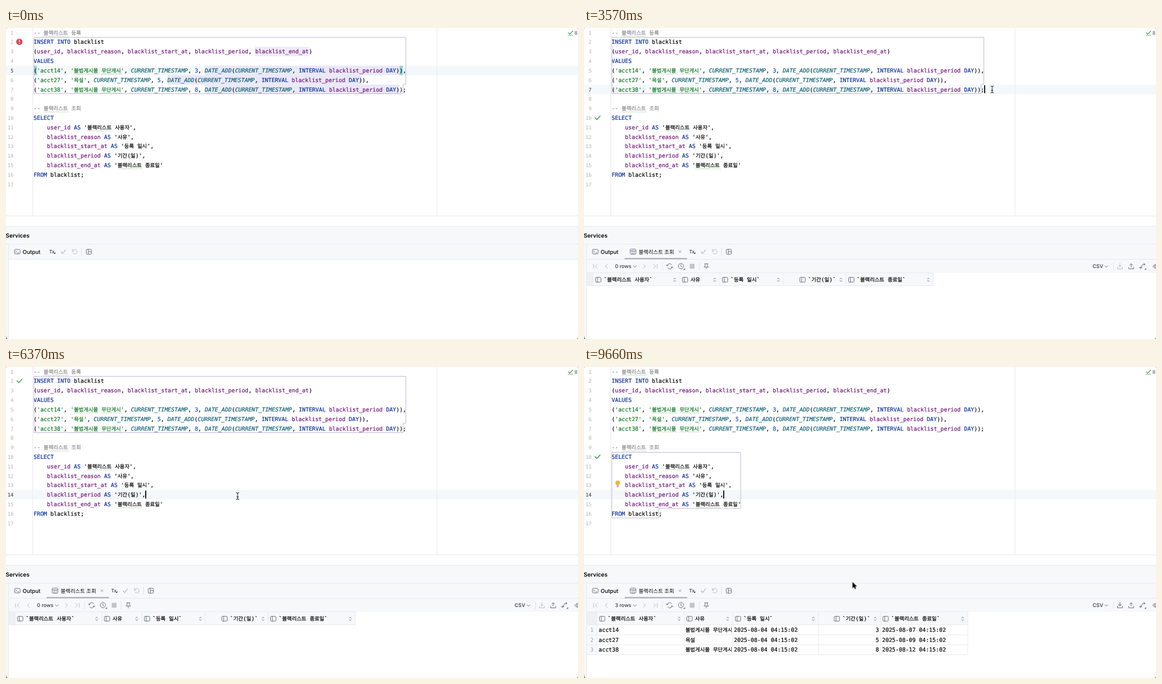
Animation of 1015x552 px, one loop 9730 ms. Source, as an HTML page:

```html
<!DOCTYPE html>
<html lang="ko">
<head>
<meta charset="utf-8">
<title>Blacklist query</title>
<style>
html, body { margin: 0; width: 100%; height: 100%; overflow: hidden; background: #fff; }
svg { display: block; width: 1015px; height: 552px; }
text { text-rendering: geometricPrecision; }
.mono { font: 9.89px "DejaVu Sans Mono", "Noto Sans Mono", monospace; }
.ko { font: 9.35px "Noto Sans CJK KR", "Noto Sans CJK JP", "Noto Sans CJK", sans-serif; }
.ui { font: 500 9.7px Inter, "Noto Sans CJK KR", sans-serif; }
.code { stroke-width: .22px; }
</style>
</head>
<body>
<svg id="stage" viewBox="0 0 1015 552"></svg>
<script>
const T = 9730, PITCH = 5.957, KO_PITCH = 8.6, ROW = 16.82;
const stage = document.getElementById('stage');
const INK = '#080808', ICON = '#6c707e', DIM = '#b8bac3', LINE = '#e8e9ee', PANEL = '#f7f8fa';
const GREEN = '#4fa35c', CALL = '#0f5f73';

function make(tag, attrs = {}, parent = stage) {
  const el = document.createElementNS('http://www.w3.org/2000/svg', tag);
  for (const key in attrs) el.setAttribute(key, attrs[key]);
  parent.appendChild(el);
  return el;
}
const group = (parent = stage) => make('g', {}, parent);
const rect = (p, x, y, width, height, fill, rx = 0) => make('rect', { x, y, width, height, fill, rx }, p);
const stroke = (p, d, color = ICON, w = 1) => make('path', {
  d, fill: 'none', stroke: color, 'stroke-width': w, 'stroke-linecap': 'round', 'stroke-linejoin': 'round'
}, p);
const fill = (p, d, color) => make('path', { d, fill: color }, p);
function label(p, str, x, y, cls, color, attrs = {}) {
  const el = make('text', { x, y, class: cls, fill: color, ...attrs }, p);
  el.textContent = str;
  return el;
}

// Timeline helpers: every track lasts one loop.
function run(el, frames) {
  el.animate(frames, { duration: T, iterations: Infinity });
}
function show(el, ...spans) {
  const frames = [];
  const add = (t, opacity) => frames.push({ offset: t / T, opacity, easing: 'step-end' });
  if (spans[0][0] > 0) add(0, 0);
  for (const [from, to] of spans) {
    add(from, 1);
    add(to, to < T ? 0 : 1);
  }
  if (frames[frames.length - 1].offset < 1) add(T, 0);
  run(el, frames);
}

// Code text on a fixed pitch; Hangul has its own size and pitch.
const isKo = s => /[가-힣]/.test(s);
const TYPO = /^(블랙리스트|불법게시물|무단게시)$/;
const widthOf = str => [...str].reduce((w, c) => w + (isKo(c) ? KO_PITCH : PITCH), 0);
function wave(p, x, y, w) {
  let d = `M${x} ${y}`;
  for (let i = 0; i * 2 < w; i++) d += `l2 ${i % 2 ? 1.2 : -1.2}`;
  stroke(p, d, '#a6cfa3', .7);
}
function put(p, str, x, y, color, { italic = false, spell = false } = {}) {
  for (const part of str.match(/[가-힣]+|[^가-힣\s]+|\s+/g)) {
    const w = widthOf(part);
    if (part.trim()) {
      const attrs = { stroke: color };
      if (italic) attrs.style = 'font-style:italic';
      label(p, part, x, y, `code ${isKo(part) ? 'ko' : 'mono'}`, color, attrs);
      if (spell && TYPO.test(part)) wave(p, x, y + 3.4, w);
    }
    x += w;
  }
  return x;
}

const mid = n => 8 + (n - 1) * ROW;
const addDate = 'DATE_ADD(CURRENT_TIMESTAMP, INTERVAL blacklist_period DAY)';
const entries = [['acct14', '불법게시물 무단게시', 3], ['acct27', '욕설', 5], ['acct38', '불법게시물 무단게시', 8]];
const code = [
  '-- 블랙리스트 등록',
  'INSERT INTO blacklist',
  '(user_id, blacklist_reason, blacklist_start_at, blacklist_period, blacklist_end_at)',
  'VALUES',
  ...entries.map(([id, why, days], i) => `('${id}', '${why}', CURRENT_TIMESTAMP, ${days}, ${addDate})${i < 2 ? ',' : ';'}`),
  '',
  '-- 블랙리스트 조회',
  'SELECT',
  "    user_id AS '블랙리스트 사용자',",
  "    blacklist_reason AS '사유',",
  "    blacklist_start_at AS '등록 일시',",
  "    blacklist_period AS '기간(일)',",
  "    blacklist_end_at AS '블랙리스트 종료일'",
  'FROM blacklist;',
  ''
];
const TOKEN = /--.*|'[^']*'|\w+|\s+|[^\w\s']+/g;
function colorOf(tok, n) {
  if (tok.startsWith('--')) return '#8c8c8c';
  if (tok[0] === "'") return n < 8 ? '#147a28' : INK;
  if (/^(INSERT|INTO|VALUES|INTERVAL|DAY|SELECT|AS|FROM)$/.test(tok)) return '#0a309f';
  if (/^(DATE_ADD|CURRENT_TIMESTAMP)$/.test(tok)) return CALL;
  if (/^\d+$/.test(tok)) return '#1c4fcf';
  if (/^(user_id|blacklist_\w+)$/.test(tok)) return '#76197f';
  return INK;
}

// Current row
const rows = { 5: [0, 840], 15: [840, 3360], 7: [3360, 6300], 14: [6300, T] };
for (const n in rows) show(rect(stage, 0, mid(n) - 8.4, 1015, ROW, '#f5f8fa'), rows[n]);

// Usage and bracket highlights
const marks = group();
rect(marks, 49 + 66 * PITCH, mid(3) - 8.4, 16 * PITCH, ROW, '#eeebf8');
entries.forEach(([id, why], i) => {
  const x = 49 + widthOf(`('${id}', '${why}', CURRENT_TIMESTAMP, 0, `), y = mid(5 + i) - 8.4;
  rect(marks, x, y, addDate.length * PITCH, ROW, '#e9e8f7');
  if (i === 0) {
    rect(marks, 49, y, PITCH, ROW, '#93d9d9');
    rect(marks, x + addDate.length * PITCH, y, PITCH, ROW, '#93d9d9');
  }
});
show(marks, [0, 840]);
show(rect(stage, 192, mid(15) - 8.4, 87, ROW, '#eeeef5'), [840, 3360]);

// Statement about to be executed
const INSERT_BOX = 'M49.5 16.5H709.5V100H704.5V116.5H49.5Z';
const SELECT_BOX = 'M49.5 151.5H278V251H132.5V268H49.5Z';
const choosing = { 15: [1470, 1750], 7: [4060, 4690], 14: [6720, 7140] };
show(fill(stage, INSERT_BOX, '#cfe3fb'), choosing[7]);
show(fill(stage, SELECT_BOX, '#cfe3fb'), choosing[15], choosing[14]);

// Editor
rect(stage, 47, 0, 1, 333, LINE);
rect(stage, 764.5, 0, 1, 333, LINE);
code.forEach((line, i) => {
  const n = i + 1, y = mid(n) + 3.6;
  const num = color => label(stage, n, 13.5, y, 'mono', color, { 'text-anchor': 'end', style: 'font-size:9px' });
  num('#aeb3c2');
  if (rows[n]) show(num('#494b57'), rows[n]);
  let x = 49;
  for (const tok of line.match(TOKEN) || []) {
    const color = colorOf(tok, n);
    x = put(stage, tok, x, y, color, { italic: color === CALL, spell: true });
  }
});
const outline = d => make('path', { d, fill: 'none', stroke: '#c3b9d8', 'stroke-width': 1 });
show(outline(INSERT_BOX), [0, 1120], [3500, 6580]);
show(outline(SELECT_BOX), [1120, 3500], [6580, T]);

const caret = (x, n) => rect(stage, x, mid(n) - 7.3, 1.8, 14, '#000');
show(caret(278.2, 15), [840, 2380], [2940, 3360]);
show(caret(710, 7), [3360, 5390], [5950, 6300]);
show(caret(247, 14), [6300, 7840], [8400, 8960], [9520, T]);

const error = group();
make('circle', { cx: 23.7, cy: 24.5, r: 5.6, fill: '#d9485a' }, error);
stroke(error, 'M23.7 21.4v3.4M23.7 27.4v.1', '#fff', 1.4);
show(error, [0, 1820]);
const tick = n => stroke(stage, `M19.5 ${mid(n) - .3}l3.3 3.3 5.7-6.2`, GREEN, 1.6);
show(tick(2), [4830, 7350]);
show(tick(10), [2240, 4620], [7560, T]);

const bulb = group();
make('circle', { cx: 59.7, cy: 205.6, r: 4.1, fill: '#f4b43c' }, bulb);
rect(bulb, 57.7, 208.4, 4, 2, '#f4b43c');
stroke(bulb, 'M58.2 211.2h3M58.8 212.8h1.8', '#8b8d96', 1);
show(bulb, [8190, T]);

stroke(stage, 'M998 8.5l2.5 2.5 5-5.5', GREEN, 1.3);
stroke(stage, 'M997.5 13.5l2-1.3 2 1.3 2-1.3 2 1.3', GREEN, 1);
label(stage, '8', 1008.5, 12.3, 'ui', ICON, { style: 'font-size:9px' });

// Statement list below the caret
function chooser(x, n, first, last) {
  const list = group(), y = mid(n) + 8.4;
  make('rect', { x: x + .5, y, width: 1020 - x, height: 94, rx: 4, fill: '#fff', stroke: '#cfd1da' }, list);
  rect(list, x + 4, y + 4, 1020 - x, 20, '#dbe6fb', 3);
  put(list, code.slice(first - 1, last).map(s => s.trim()).join(' '), x + 10, y + 17.5, INK);
  show(list, choosing[n]);
}
chooser(279, 15, 10, 16);
chooser(711, 7, 2, 7);
chooser(248, 14, 10, 16);

// Tool window
rect(stage, 0, 333, 1015, 1, LINE);
show(label(stage, '블랙리스트 종료일', -3, 346, 'ko', '#5a5d6b'), [840, 3360]);
rect(stage, 0, 351.5, 1015, 59, PANEL);
rect(stage, 0, 351.5, 1015, 1, LINE);
rect(stage, 0, 383, 1015, 1, LINE);
rect(stage, 0, 410, 1015, 1, LINE);
rect(stage, 0, 384, 4.5, 168, PANEL);
rect(stage, 4, 384, 1, 168, LINE);
label(stage, 'Services', -.5, 371.6, 'ui', '#000', { style: 'font-weight:600;font-size:10px' });

make('rect', { x: 15, y: 393, width: 10, height: 8, rx: 1.5, fill: 'none', stroke: ICON });
stroke(stage, 'M17 395.5l1.8 1.5-1.8 1.5M20.5 399h2.3', ICON, .9);
label(stage, 'Output', 29.5, 400.6, 'ui', '#000');

const actions = group();
label(actions, 'Tx', 76.5, 400.2, 'ui', '#33353d', { style: 'font-size:8.5px' });
fill(actions, 'M87.5 397.8v3h-3z', '#33353d');
stroke(actions, 'M97.8 397.3l2.6 3 5.2-6.3', DIM, 1.3);
stroke(actions, 'M117.8 393v3.2h3.2M118 396a4.2 4.2 0 1 1 .6 3.4', DIM);
rect(actions, 133.5, 390, 1, 14, '#dcdde3');
make('rect', { x: 142.5, y: 392.8, width: 9, height: 8.6, rx: 1.3, fill: 'none', stroke: ICON }, actions);
stroke(actions, 'M146 393v8.4M146 397h5.3');
run(actions, [
  { offset: 0, transform: 'translate(0px, 0px)', easing: 'step-end' },
  { offset: 1820 / T, transform: 'translate(110px, 0px)', easing: 'step-end' },
  { offset: 1, transform: 'translate(110px, 0px)' }
]);

// Result tab and its toolbar
const result = group();
show(result, [1820, T]);
rect(result, 5, 411, 1010, 23.5, PANEL);
const tableIcon = (x, y) => {
  make('rect', { x, y, width: 10, height: 9, rx: 1.3, fill: 'none', stroke: ICON }, result);
  stroke(result, `M${x} ${y + 3}h10M${x + 3.4} ${y + 3}v6M${x + 6.8} ${y + 3}v6`, ICON, .9);
};
tableIcon(82, 392.5);
label(result, '블랙리스트 조회', 97, 400.6, 'ko', '#000');
stroke(result, 'M168.3 395l4 4m0-4l-4 4', '#8f929d', .9);
rect(result, 72, 408.3, 111, 2.2, '#a9adba', 1);

stroke(result, 'M17 419.5v7M23.5 419.5l-3.5 3.5 3.5 3.5', DIM);
stroke(result, 'M41.5 419.5l-3.5 3.5 3.5 3.5M105.5 419.5l3.5 3.5-3.5 3.5', DIM);
stroke(result, 'M123.5 419.5l3.5 3.5-3.5 3.5M130 419.5v7', DIM);
const rowCount = n => label(result, `${n} rows`, 55, 426.2, 'ui', '#33353d', { style: 'font-size:9px' });
show(rowCount(0), [1820, 7560]);
show(rowCount(3), [7560, T]);
stroke(result, 'M87.5 422l2.7 2.6 2.7-2.6M924.5 422l2.6 2.6 2.6-2.6');
for (const x of [138.5, 204, 939]) rect(result, x, 416, 1, 14, '#e3e4ea');
stroke(result, 'M147.5 422a4.5 4.5 0 0 1 8-2M156.5 424a4.5 4.5 0 0 1-8 2M146 420.3l1.5 1.9 2-1.3M158 425.7l-1.5-1.9-2 1.3');
make('circle', { cx: 172, cy: 422.6, r: 4.7, fill: 'none', stroke: ICON }, result);
stroke(result, 'M172 420v3l1.8 1.3');
fill(result, 'M179.3 426v3.2h-3.2z', ICON);
rect(result, 187.6, 418.6, 8.6, 8.6, '#c3c4ca', 1);
stroke(result, 'M214 418.5h6M215 418.5v3.5l-2 2.3h8l-2-2.3v-3.5M217 424.5v3.2');
label(result, 'CSV', 902.5, 426.2, 'ui', '#33353d', { style: 'font-size:9px' });
const download = color => stroke(result, 'M951 418v6M948.4 421.6l2.6 2.6 2.6-2.6M946.7 424.5v3h8.6v-3', color);
download(DIM);
show(download(ICON), [7560, T]);
stroke(result, 'M971 424.5v-6M968.4 421l2.6-2.6 2.6 2.6M966.7 424.5v3h8.6v-3');
stroke(result, 'M986 425.5h4M995.5 419.5h-4l-3 6M993.5 417.5l2 2-2 2M988 423.5l-2 2 2 2');
fill(result, 'M997.5 426v3.2h-3.2z', ICON);
stroke(result, 'M1009.5 423q2.5-4 6-4M1009.5 423q2.5 4 6 4');
make('circle', { cx: 1014, cy: 423, r: 1.6, fill: 'none', stroke: ICON }, result);

// Grid headers; the fourth column is aligned right
const titles = ['`블랙리스트 사용자`', '사유', '`등록 일시`', '`기간(일)`', '`블랙리스트 종료일`'];
function header(p, edges) {
  const end = edges[5];
  rect(p, 5, 434.5, end - 5, 23, PANEL);
  rect(p, 5, 434.5, edges[0] - 5, 23, '#eff0f4');
  rect(p, 5, 434, end - 5, 1, LINE);
  rect(p, 5, 457, end - 5, 1, LINE);
  edges.forEach(x => rect(p, x - .5, 434.5, 1, 23, LINE));
  titles.forEach((title, i) => {
    const right = edges[i + 1], x = i === 3 ? right - 82 : edges[i] + 4.5;
    make('rect', { x, y: 442.5, width: 9.5, height: 8.5, rx: 1.3, fill: 'none', stroke: ICON }, p);
    stroke(p, `M${x + 3.2} 442.5v8.5`, ICON);
    put(p, title, x + 14.5, 450.3, INK);
    stroke(p, `M${right - 10.8} 445.6l1.7-1.8 1.7 1.8M${right - 10.8} 448.2l1.7 1.8 1.7-1.8`, ICON, .9);
  });
}
const empty = group();
header(empty, [16, 170, 241, 354, 465, 620]);
show(empty, [1820, 7350]);

const grid = group();
const cols = [23, 178, 264, 416, 526, 681];
header(grid, cols);
rect(grid, 5, 458, 18, 52, PANEL);
cols.forEach(x => rect(grid, x - .5, 458, 1, 52, LINE));
const clip = make('clipPath', { id: 'reason' }, make('defs'));
rect(clip, 178, 458, 84, 54, '#000');
const reasons = make('g', { 'clip-path': 'url(#reason)' }, grid);
entries.forEach(([id, why, days], i) => {
  const y = 470.2 + i * 17.6;
  rect(grid, 5, 475 + i * 17.6, 676, 1, LINE);
  label(grid, i + 1, 14, y, 'mono', '#9ea2b0', { 'text-anchor': 'middle' });
  put(grid, id, 26, y, INK);
  put(reasons, why, 180, y, INK);
  put(grid, '2025-08-04 04:15:02', 266, y, INK);
  put(grid, `${days}`, 523.5 - PITCH, y, INK);
  put(grid, `2025-08-${String(4 + days).padStart(2, '0')} 04:15:02`, 529, y, INK);
});
show(grid, [7350, T]);

// Busy indicator
const busy = make('g', { transform: 'translate(527 501)' });
const wheel = group(busy);
for (let i = 0; i < 8; i++) {
  const a = i * Math.PI / 4, c = Math.cos(a), s = Math.sin(a);
  stroke(wheel, `M${c * 4.6} ${s * 4.6}L${c * 8.8} ${s * 8.8}`, '#80838d', 2.3).setAttribute('opacity', .25 + i * .09);
}
wheel.animate([{ transform: 'rotate(0deg)' }, { transform: 'rotate(360deg)' }],
  { duration: 560, iterations: Infinity, easing: 'steps(8)' });
show(busy, [1820, 2310], [7350, 7770]);

// Window corners
fill(stage, 'M0 545v7h3q-2.5-2-3-7z', '#8b8d92');
fill(stage, 'M1015 549v3h-3q2.5-.5 3-3z', '#8b8d92');
fill(stage, 'M0 0h2q-1.6.4-2 2zM1015 0h-2q1.6.4 2 2z', '#a5a7ac');

// Pointer
const pointer = group();
const beam = group(pointer);
const bar = 'M-2.6-6q2.1 0 2.6 1.2q.5-1.2 2.6-1.2M0-5V5M-2.6 6q2.1 0 2.6-1.2q.5 1.2 2.6 1.2M-1.4 1.6h2.8';
stroke(beam, bar, '#fff', 2.4);
stroke(beam, bar, '#222', 1.1);
const arrow = group(pointer);
make('path', {
  d: 'M0 0V11L2.6 8.7 4.4 12.6 6.3 11.8 4.6 8H8Z', fill: '#000', stroke: '#fff', 'stroke-width': 1, 'paint-order': 'stroke'
}, arrow);
show(arrow, [70, 540], [9590, T]);
show(beam, [540, 1400], [2240, 3990], [5250, 6650], [9450, 9590]);
const path = [
  [0, 560, 516], [70, 560, 516], [770, 330, 243], [2240, 330, 243], [2950, 732, 96], [3220, 724.3, 109],
  [5250, 724.3, 109], [5320, 717, 102], [5500, 700, 86], [6020, 411, 239], [6160, 411, 229],
  [9450, 411, 229], [9660, 476.4, 381.6], [T, 476.4, 381.6]
];
run(pointer, path.map(([t, x, y]) => ({ offset: t / T, transform: `translate(${x}px, ${y}px)`, easing: 'linear' })));
</script>
</body>
</html>
```
